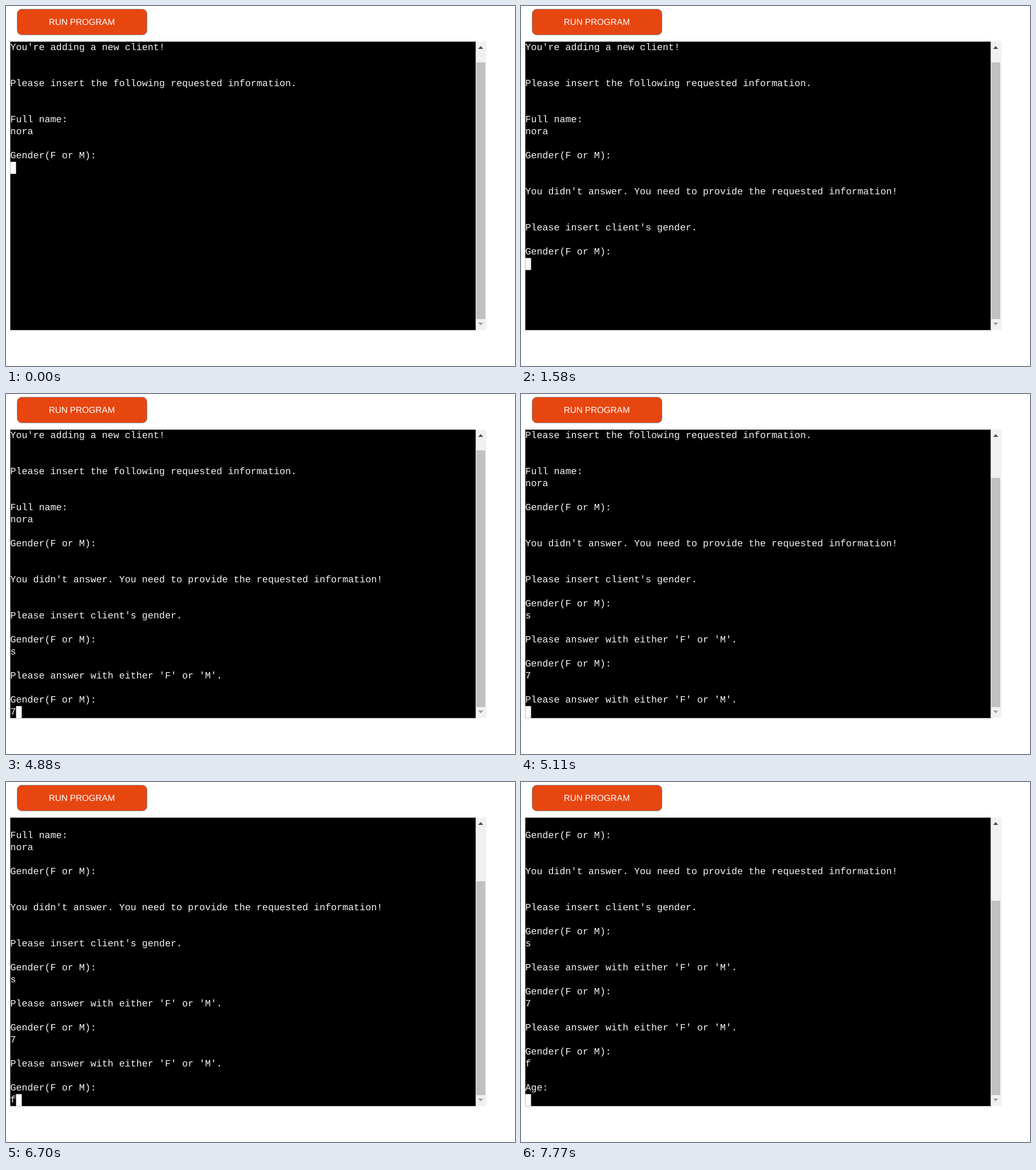
Write an HTML page with a canvas that moves like this. It is 890 by 629 pixels and loops after 7.85 s.

```html
<!DOCTYPE html>
<html lang="en">
<head>
<meta charset="utf-8">
<title>Client form in a terminal</title>
<style>
  html, body { margin: 0; width: 100%; height: 100%; overflow: hidden; background: #fff; }
  canvas { display: block; }
</style>
</head>
<body>
<canvas id="stage" width="890" height="629"></canvas>
<script>
const ctx = document.getElementById('stage').getContext('2d');
const LOOP = 7850;
const LEFT = 7.5, TOP = 62.3, RIGHT = 821.5, ROW = 21, ROWS = 24, COL = 10.03;
const BOTTOM = TOP + ROW * ROWS;

const prompt = 'Gender(F or M):\n';
const retry = "\n\nPlease answer with either 'F' or 'M'.\n";

// Terminal output: [time in ms, appended text]
const output = [
  [0, "You're adding a new client!\n\n\nPlease insert the following requested information.\n\n\n" +
      'Full name:\nnora\n\n' + prompt],
  [1250, "\n\nYou didn't answer. You need to provide the requested information!\n\n\n" +
         "Please insert client's gender.\n"],
  [1580, '\n' + prompt],
  [3400, 's'],
  [3560, retry],
  [3880, '\n' + prompt],
  [4880, '7'],
  [5110, retry],
  [5370, '\n' + prompt],
  [6700, 'f'],
  [7430, '\n'],
  [7770, '\nAge:\n'],
];

function rect(color, x, y, w, h) {
  ctx.fillStyle = color;
  ctx.fillRect(x, y, w, h);
}

function arrow(color, y, dir) {
  ctx.fillStyle = color;
  ctx.beginPath();
  ctx.moveTo(825.5, y);
  ctx.lineTo(830, y - 5 * dir);
  ctx.lineTo(834.5, y);
  ctx.fill();
}

function drawButton() {
  ctx.beginPath();
  ctx.roundRect(19.5, 5.5, 227, 45, 8);
  ctx.fillStyle = '#e84610';
  ctx.fill();
  ctx.strokeStyle = '#8c8c8c';
  ctx.lineWidth = 1;
  ctx.stroke();
  ctx.font = '15.2px "Liberation Sans", Arial, sans-serif';
  ctx.textAlign = 'center';
  ctx.fillStyle = '#fff';
  ctx.fillText('RUN PROGRAM', 132.5, 33);
}

function drawScrollbar(scrolled) {
  rect('#f1f1f1', RIGHT, TOP, 840 - RIGHT, BOTTOM - TOP);
  const thumbTop = 547.8 - 468 * ROWS / (ROWS + 1 + scrolled);
  rect('#c1c1c1', 822.5, thumbTop, 15.5, 547 - thumbTop);
  arrow('#505050', 75, 1);
  arrow('#a3a3a3', 553, -1);
}

function drawTerminal(time) {
  const lines = output.filter(([start]) => start <= time).map(([, text]) => text).join('').split('\n');
  const scrolled = Math.max(0, lines.length - ROWS);
  const visible = lines.slice(scrolled);

  rect('#000', LEFT, TOP, RIGHT - LEFT, BOTTOM - TOP);
  ctx.font = '16.71px "Liberation Mono", "Courier New", monospace';
  ctx.textAlign = 'left';
  ctx.fillStyle = '#f4f4f4';
  visible.forEach((line, i) => ctx.fillText(line, LEFT, TOP + i * ROW + 15));

  const cursorX = LEFT + visible.at(-1).length * COL;
  rect('#fff', cursorX, TOP + (visible.length - 1) * ROW, COL, ROW);
  drawScrollbar(scrolled);
}

function draw() {
  rect('#fff', 0, 0, 890, 629);
  ctx.textRendering = 'geometricPrecision';
  drawButton();
  drawTerminal(performance.now() % LOOP);
  requestAnimationFrame(draw);
}
draw();
</script>
</body>
</html>
```
